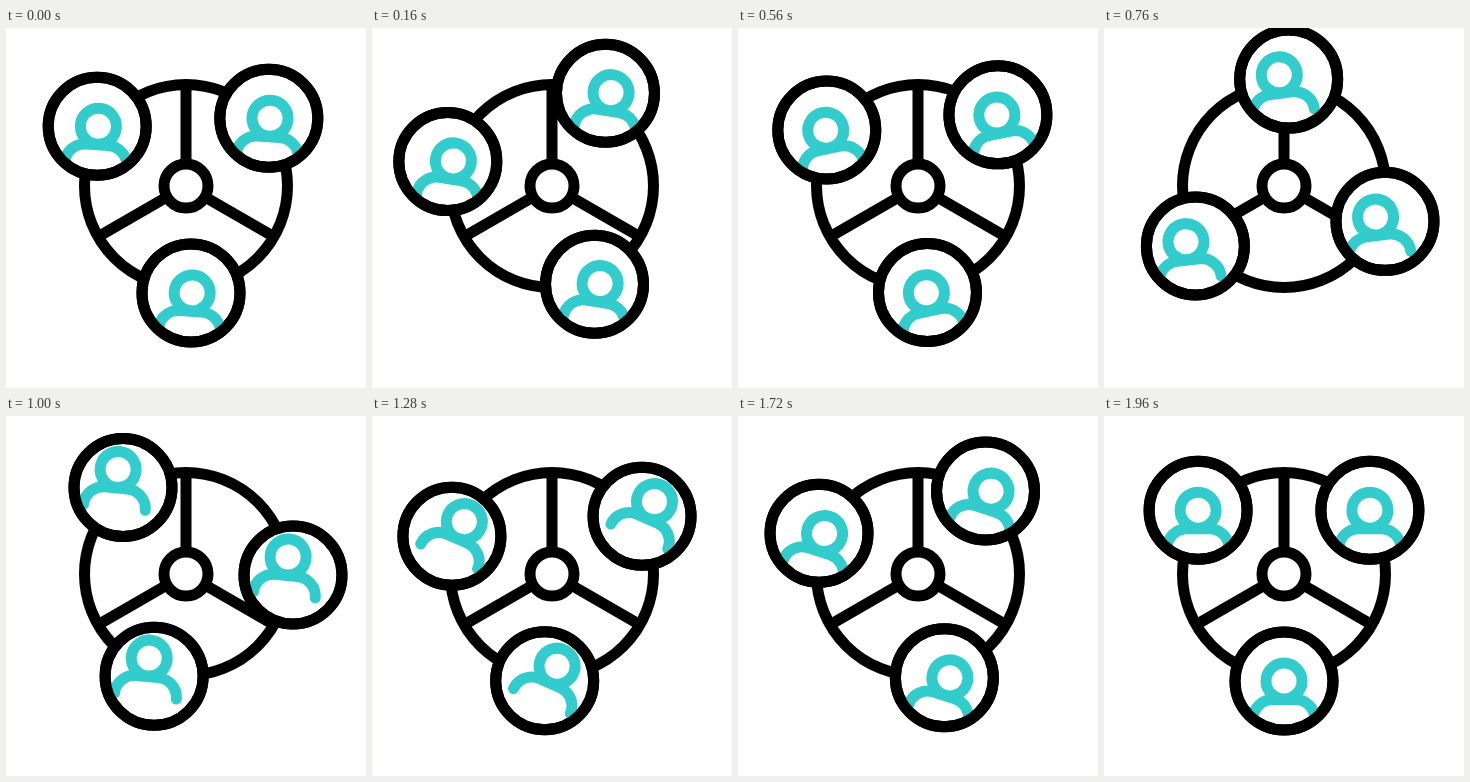
Recreate the animation shown at these times as an HTML page. Size 360x360 px, loop 2000 ms.

```html
<!DOCTYPE html>
<html>
<head>
<meta charset="utf-8">
<style>
html, body { margin: 0; width: 100%; height: 100%; overflow: hidden; background: #fff; }
svg { display: block; width: 100%; height: 100%; }
</style>
</head>
<body>
<svg viewBox="0 0 360 360" fill="#fff" stroke="#000" stroke-width="11">
  <defs>
    <clipPath id="disc"><circle r="45"/></clipPath>
    <g id="person" fill="none" stroke="#33cccc" stroke-linecap="round">
      <circle r="18"/>
      <path d="M-31 38a20 19.5 0 0 1 20-19.5h22a20 19.5 0 0 1 20 19.5"/>
    </g>
  </defs>
  <g transform="translate(180 158)">
    <circle r="101.5"/>
    <path d="M0 0V-101.5M0 0L-87.9 50.75M0 0L87.9 50.75"/>
    <circle r="22"/>
    <g id="orbit"></g>
  </g>
</svg>
<script>
const LOOP = 2000, PHASE = 40, RADIUS = 107, PIVOT = 10;
const rad = deg => deg * Math.PI / 180;

// Smooth curve through [time, degrees] keys, flat at turning points and ends
function curve(keys) {
  const slope = i => (keys[i + 1][1] - keys[i][1]) / (keys[i + 1][0] - keys[i][0]);
  const tangents = keys.map((key, i) => {
    if (!i || i === keys.length - 1) return 0;
    const a = slope(i - 1), b = slope(i);
    if (a * b <= 0) return 0;
    const before = key[0] - keys[i - 1][0], after = keys[i + 1][0] - key[0];
    return (a * after + b * before) / (before + after);
  });
  return t => {
    let i = 0;
    while (i < keys.length - 2 && t >= keys[i + 1][0]) i++;
    const [t0, p0] = keys[i], [t1, p1] = keys[i + 1];
    const h = t1 - t0, u = (t - t0) / h, v = 1 - u;
    return p0 + (p1 - p0) * u * u * (3 - 2 * u)
      + h * u * v * (tangents[i] * v - tangents[i + 1] * u);
  };
}

const turn = curve([[0, 0], [40, -2.6], [200, -23.3], [380, -41], [600, -5.3],
  [1040, 143.6], [1320, 237], [1560, 308], [1720, 340], [2000, 360]]);
const counterTurn = curve([[0, 0], [40, -6.5], [200, -32.5], [325, -41], [600, 6],
  [1040, 138], [1320, 213.5], [1560, 278], [2000, 360]]);

const orbit = document.getElementById('orbit');
const badges = [216.6, 323.4, 90].map(angle => {
  orbit.insertAdjacentHTML('beforeend',
    '<g><circle r="49"/><g clip-path="url(#disc)"><use href="#person"/></g><circle r="49" fill="none"/></g>');
  const node = orbit.lastElementChild;
  return { angle, node, person: node.querySelector('use') };
});

function draw(now) {
  const t = (now + PHASE) % LOOP;
  const spin = turn(t), tilt = spin - counterTurn(t);
  const px = -PIVOT * Math.sin(rad(spin)), py = PIVOT * Math.cos(rad(spin));
  for (const { angle, node, person } of badges) {
    const a = rad(angle + spin);
    node.setAttribute('transform', `translate(${RADIUS * Math.cos(a)} ${RADIUS * Math.sin(a)})`);
    person.setAttribute('transform', `translate(${px} ${py}) rotate(${tilt}) translate(0 ${-PIVOT})`);
  }
}

const start = performance.now();
function tick() {
  draw(performance.now() - start);
  requestAnimationFrame(tick);
}
tick();
</script>
</body>
</html>
```
